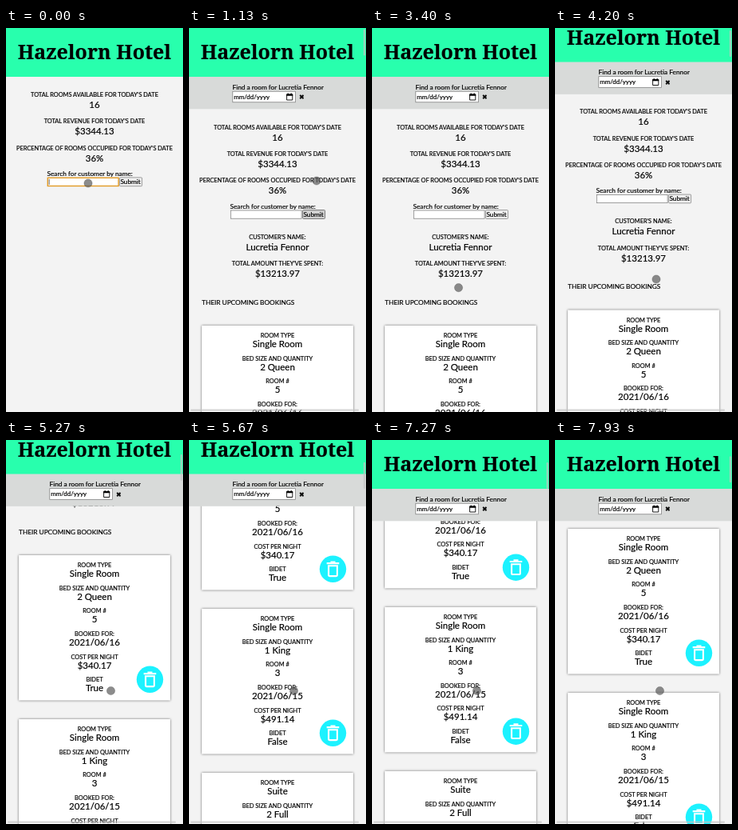
Write an HTML page that moves like this. It is 222 px wide and 480 px high and loops after 8 s.

```html
<!DOCTYPE html>
<html lang="en">
<head>
<meta charset="utf-8">
<title>Hotel manager dashboard</title>
<style>
  html, body { margin: 0; width: 100%; height: 100%; overflow: hidden; background: #f3f3f3; }
  svg { display: block; width: 100%; height: 100%; }
  text { font-family: Lato, sans-serif; font-size: 8.28px; fill: #000; stroke: #000; stroke-width: .18px; white-space: pre; }
  .label { font-size: 7.4px; text-anchor: middle; }
  .value { font-size: 11.5px; text-anchor: middle; }
  .title { font: bold 25px "Noto Serif", serif; text-anchor: middle; }
  .date { font-size: 7.9px; }
  .close { font: 8px "DejaVu Sans", sans-serif; }
  .field { fill: #fff; stroke: #767676; stroke-width: .7; }
  .card { fill: #fff; filter: drop-shadow(.4px .4px 1.5px #666); }
  .thumb { fill: #c4c4c4; fill-opacity: .7; }
</style>
</head>
<body>
<svg viewBox="0 0 222 480" preserveAspectRatio="none">
  <defs>
    <g id="trash">
      <circle r="16.7" fill="#1cf2ff"/>
      <g fill="none" stroke="#fff" stroke-width="2.1">
        <path d="M-7.8 -7.2H7.8M-3 -8.8H3"/>
        <path d="M-5.4 -4H5.4V7.2Q5.4 8.8 3.8 8.8H-3.8Q-5.4 8.8 -5.4 7.2Z"/>
      </g>
    </g>
  </defs>
  <g id="page"></g>
  <g id="top">
    <g id="bar">
      <rect y="60" width="222" height="41.3" fill="#d8dad9"/>
      <text id="find" x="54.5" y="76.6"></text>
      <rect class="field" x="54.8" y="79.2" width="78.8" height="13.6"/>
      <text class="date" x="56.2" y="88.8">mm/dd/yyyy</text>
      <path d="M122.6 83.2H129.8V90H122.6Z" fill="none" stroke="#000" stroke-width=".9"/>
      <path d="M122.2 82.4H130.2V84.8H122.2ZM123.6 81.4h1.2v1.4h-1.2ZM127.6 81.4h1.2v1.4h-1.2Z"/>
      <text class="close" x="138" y="89">✖</text>
    </g>
    <rect y="-2" width="222" height="63" fill="#28ffad"/>
    <text class="title" x="111" y="39">Hazelorn Hotel</text>
  </g>
  <g id="bars">
    <rect id="thumb" class="thumb" x="218.8" width="2.4" height="33" rx="1.2"/>
    <rect class="thumb" x="2" y="476.6" width="211" height="2.2" rx="1.1"/>
  </g>
  <circle id="pointer" r="5.1" fill="#555" fill-opacity=".68" stroke="#333" stroke-opacity=".4" stroke-width=".7"/>
</svg>
<script>
const LOOP = 8000, FPS = 15, SUBMIT_AT = 930, TURN_AT = 6600;
const BAR_HEIGHT = 40.7, HEADER_SLIDE = 18.5, CARD_PITCH = 205;
const GUEST = 'Lucretia Fennor';
const $ = id => document.getElementById(id);
const clamp = (v, max = 1) => Math.min(max, Math.max(0, v));
const progress = (t, start, duration) => clamp((t - start) / duration);
const easeOut = p => 1 - (1 - p) ** 2;

function add(parent, tag, attrs, content = '') {
  const node = document.createElementNS('http://www.w3.org/2000/svg', tag);
  for (const key in attrs) node.setAttribute(key, attrs[key]);
  node.textContent = content;
  return parent.appendChild(node);
}

function pair(parent, y, label, value, gap) {
  add(parent, 'text', { class: 'label', x: 111, y }, label);
  add(parent, 'text', { class: 'value', x: 111, y: y + gap }, value);
}

const page = $('page');
$('find').textContent = 'Find a room for ' + GUEST;

// Dashboard and search form
[['TOTAL ROOMS AVAILABLE FOR TODAY’S DATE', '16'],
 ['TOTAL REVENUE FOR TODAY’S DATE', '$3344.13'],
 ['PERCENTAGE OF ROOMS OCCUPIED FOR TODAY’S DATE', '36%']
].forEach(([label, value], i) => pair(page, 127 + i * 33.2, label, value, 14));
add(page, 'text', { x: 51.5, y: 225.8 }, 'Search for customer by name:');
const input = add(page, 'rect', { class: 'field', x: 52.3, y: 228, width: 88.8, height: 10.2 });
const typed = add(page, 'text', { x: 54, y: 236 });
const caret = add(page, 'rect', { x: 53.8, y: 229.6, width: .6, height: 7 });
const button = add(page, 'rect', { x: 142.6, y: 227.6, width: 28, height: 10.8, rx: 1, stroke: '#767676' });
add(page, 'text', { x: 143.4, y: 236 }, 'Submit');

// Customer details and booking cards
const results = add(page, 'g', {});
pair(results, 263.8, 'CUSTOMER’S NAME:', GUEST, 14.2);
pair(results, 297.4, 'TOTAL AMOUNT THEY’VE SPENT:', '$13213.97', 14);
add(results, 'text', { x: 16, y: 346 }, 'THEIR UPCOMING BOOKINGS');

const fields = ['ROOM TYPE', 'BED SIZE AND QUANTITY', 'ROOM #', 'BOOKED FOR:', 'COST PER NIGHT', 'BIDET'];
[['Single Room', '2 Queen', '5', '2021/06/16', '$340.17', 'True'],
 ['Single Room', '1 King', '3', '2021/06/15', '$491.14', 'False'],
 ['Suite', '2 Full', '2', '2021/06/15', '$477.38', 'False'],
 ['Single Room', '1 Queen', '4', '2021/06/14', '$429.44', 'False']
].forEach((values, i) => {
  const card = add(results, 'g', { transform: `translate(0 ${372 + i * CARD_PITCH})` });
  add(card, 'rect', { class: 'card', x: 16, y: 0, width: 190, height: 181.5 });
  fields.forEach((label, j) => pair(card, 15.2 + j * 28.6, label, values[j], 11.9));
  add(card, 'use', { href: '#trash', x: 180.5, y: 155.3 });
});

// Each wheel flick glides a distance and slows to a stop
const flicks = [
  { at: 3870, by: 20 }, { at: 4200, by: 55 }, { at: 4670, by: 153 }, { at: 5270, by: 138 },
  { at: 5930, by: 165 }, { at: 6670, by: -131 }, { at: 7200, by: -102 }, { at: 7730, by: -48 }
];
const scrollAt = t => flicks.reduce((sum, f) => sum + f.by * easeOut(progress(t, f.at, 390)), 0);
const deepest = scrollAt(TURN_AT);

// The header slides away first on the way down and returns first on the way up
const headerAt = (t, scroll) =>
  clamp(t < TURN_AT ? scroll : HEADER_SLIDE - deepest + scroll, HEADER_SLIDE);

// Pointer sweeps: straight travel plus a swing to the sides and along y
const sweeps = [
  { at: 0, lasts: 870, move: [57, -3], swing: [60, -156] },
  { at: 2130, lasts: 870, move: [-44, -41], swing: [50, 110] },
  { at: 3000, lasts: 870, move: [11, 164], swing: [-50, 100] },
  { at: 4200, lasts: 330, move: [4.5, -.5], swing: [0, 0] }
];
const pointerAt = t => sweeps.reduce(([x, y], s) => {
  const p = progress(t, s.at, s.lasts);
  return [
    x + s.move[0] * p + s.swing[0] * Math.sin(2 * Math.PI * p),
    y + s.move[1] * p + s.swing[1] * Math.sin(Math.PI * p)
  ];
}, [103, 194]);

function draw(t) {
  const submitted = t >= SUBMIT_AT;
  const scroll = scrollAt(t);

  page.setAttribute('transform', `translate(0 ${submitted ? -scroll : -BAR_HEIGHT})`);
  $('top').setAttribute('transform', `translate(0 ${-headerAt(t, scroll)})`);
  $('bar').style.display = results.style.display = submitted ? '' : 'none';

  const letters = Math.floor(progress(t, 60, 700) * GUEST.length);
  typed.textContent = submitted ? '' : GUEST.slice(0, letters);
  caret.style.display = submitted || letters ? 'none' : '';
  input.style.stroke = submitted ? '#767676' : '#e29a25';
  input.style.strokeWidth = submitted ? .7 : 1.4;
  const pressed = submitted && t < 2200;
  button.style.fill = pressed ? '#d2d2d2' : '#efefef';
  button.style.strokeWidth = pressed ? 1 : .7;

  const flash = progress(t, SUBMIT_AT, 140) - progress(t, 1540, 400);
  $('bars').style.opacity = flash + progress(t, 3870, 140);
  $('thumb').setAttribute('y', 1.5 + scroll * .072);
  $('pointer').setAttribute('transform', `translate(${pointerAt(t)})`);
}

const start = performance.now();
function tick(now) {
  const t = Math.max(0, now - start) % LOOP;
  draw(Math.floor((t + 4) * FPS / 1000) * 1000 / FPS);
  requestAnimationFrame(tick);
}
draw(0);
requestAnimationFrame(tick);
</script>
</body>
</html>
```
